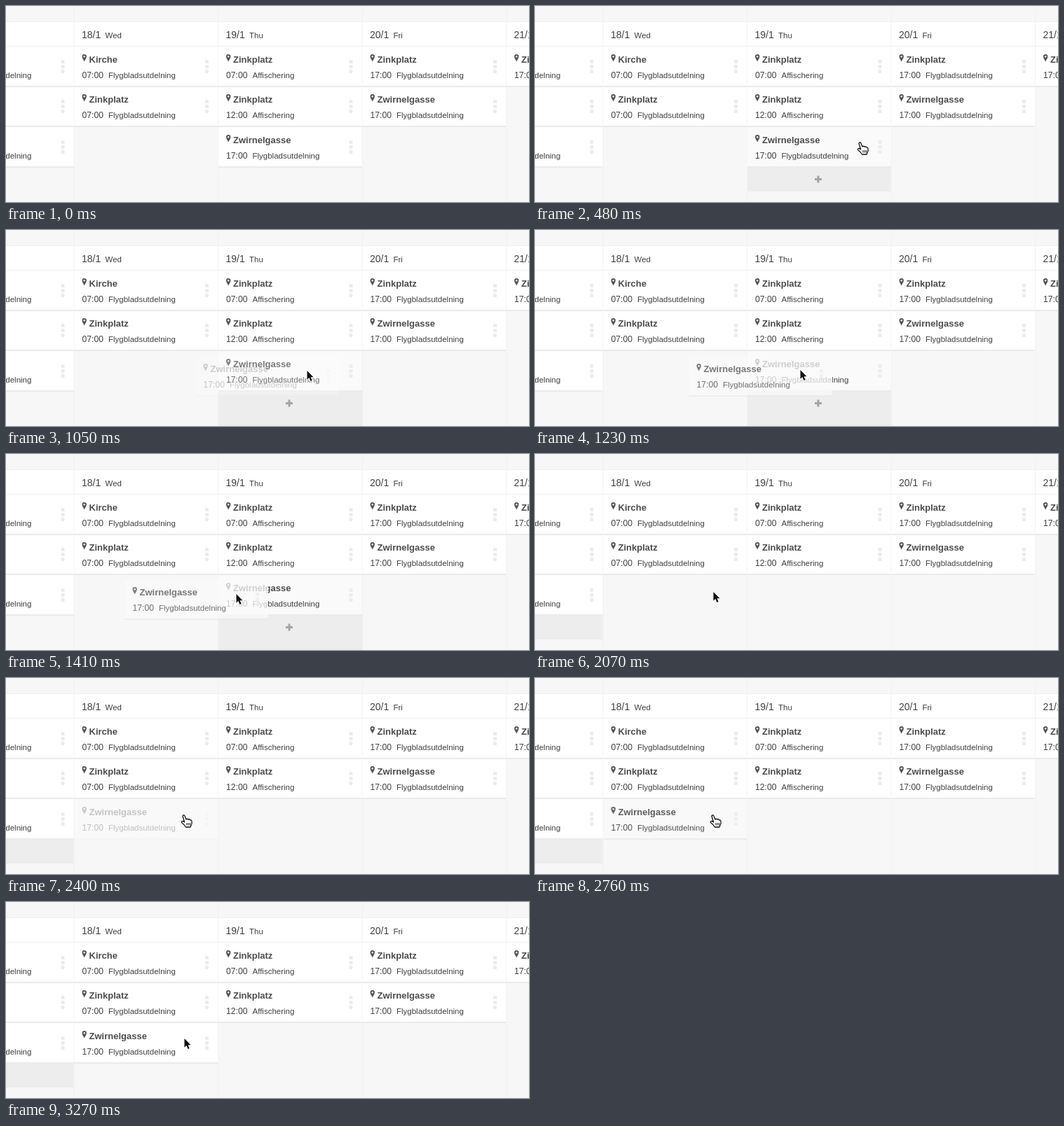
Animation of 746x280 px, one loop 3.3 s. Source, as an HTML page with a canvas:

```html
<!DOCTYPE html>
<html lang="sv">
<head>
<meta charset="utf-8">
<title>Calendar drag and drop</title>
<style>
html, body { margin: 0; width: 746px; height: 280px; overflow: hidden; background: #f7f7f7; }
canvas { display: block; }
</style>
</head>
<body>
<canvas width="746" height="280"></canvas>
<script>
const ctx = document.querySelector('canvas').getContext('2d');
const LOOP = 3300, LEFT = -108.5, COL = 205.5, ROW = 57.4;
const DRAG = 960, CROSS = 1490, DROP = 2050, FADE = 2220, REST = 2900;
const FONT = '"Liberation Sans", Arial, sans-serif';
const SQUARE = 'Zinkplatz', STREET = 'Zwirnelgasse';
const FLYER = 'Flygbladsutdelning', POSTER = 'Affischering';

const moved = [STREET, '17:00', FLYER];
const days = [
  ['17/1', 'Tue', [['Kirche', '07:00', FLYER], ['Kirche', '12:00', POSTER], ['Kirche', '17:00', FLYER]]],
  ['18/1', 'Wed', [['Kirche', '07:00', FLYER], [SQUARE, '07:00', FLYER]]],
  ['19/1', 'Thu', [[SQUARE, '07:00', POSTER], [SQUARE, '12:00', POSTER]]],
  ['20/1', 'Fri', [[SQUARE, '17:00', FLYER], [STREET, '17:00', FLYER]]],
  ['21/1', 'Sat', [[SQUARE, '17:00', FLYER]]]
];

// Pointer keys: time, x, y
const track = [
  [30, 490, 286], [240, 472, 216], [450, 464, 195], [840, 464, 195], [960, 452, 198],
  [1050, 429, 200], [1410, 328, 199], [1530, 290, 197], [1680, 261, 194], [1860, 254, 196]
];

const pin = new Path2D('M3.2 0a3.2 3.2 0 0 1 3.2 3.3C6.4 5.6 4.4 7.6 3.2 10.6 2 7.6 0 5.6 0 3.3A3.2 3.2 0 0 1 3.2 0zM3.2 2a1.3 1.3 0 1 0 0 2.6 1.3 1.3 0 0 0 0-2.6z');
const arrow = new Path2D('M0 0V12.8L2.9 10.1 5 15 7.2 14.1 5.1 9.3H9z');
const hand = new Path2D('M-2 1Q-.5-1.5 1 1L3 6Q4.6 4.4 6 6.2 7.8 5 8.8 7 11 6.4 11 9V12L9 17H2.5Q0 13-3.5 10.5-3.8 7.8-1.4 8.6L.6 10z');
const knuckles = new Path2D('M4 11V14.5M6.2 11V14.5M8.4 11V14.5');

const at = i => LEFT + COL * i;
const rowTop = i => Math.round(57 + ROW * i);
const clamp = v => Math.max(0, Math.min(1, v));

function rect(x, y, w, h, color) {
  ctx.fillStyle = color;
  ctx.fillRect(x, y, w, h);
}

function text(s, x, y, size, weight = 400, color = '#404040') {
  ctx.font = `${weight} ${size}px ${FONT}`;
  ctx.fillStyle = color;
  ctx.fillText(s, x, y);
}

function card([place, time, job], x, y, alpha = 1, bg = '#fff') {
  ctx.globalAlpha = alpha;
  rect(x + .5, y + 1, COL - 1, 56, bg);
  rect(x + .5, y + 57, COL - 1, 2, '#ebebeb');
  ctx.save();
  ctx.translate(x + 11.5, y + 12);
  ctx.fillStyle = '#555';
  ctx.fill(pin, 'evenodd');
  ctx.restore();
  text(place, x + 21.5, y + 24, 13, 700, '#4c4c4c');
  text(time, x + 11.5, y + 46, 12.2);
  text(job, x + 49, y + 46, 11.5);
  for (let i = 0; i < 3; i++) {
    ctx.fillStyle = '#ececec';
    ctx.beginPath();
    ctx.roundRect(x + 187, y + 20 + 7 * i, 5, 5, 1);
    ctx.fill();
  }
  ctx.globalAlpha = 1;
}

function addBar(i) {
  const x = at(i), mid = x + 101.5;
  rect(x + .5, 230, COL - 1, 35, '#ededed');
  rect(mid - 5, 246, 10, 3, '#a3a3a3');
  rect(mid - 1.5, 242.5, 3, 10, '#a3a3a3');
}

function pointer(t) {
  const i = track.findIndex(k => k[0] > t);
  if (i < 0) return track[track.length - 1].slice(1);
  const a = track[i - 1], b = track[i], f = (t - a[0]) / (b[0] - a[0]);
  return [a[1] + (b[1] - a[1]) * f, a[2] + (b[2] - a[2]) * f];
}

function drawPointer(x, y, pointing) {
  ctx.save();
  ctx.translate(Math.round(x), Math.round(y));
  ctx.lineJoin = 'round';
  if (pointing) {
    ctx.fillStyle = '#fff';
    ctx.strokeStyle = '#111';
    ctx.fill(hand);
    ctx.lineWidth = 1.3;
    ctx.stroke(hand);
    ctx.lineWidth = 1;
    ctx.stroke(knuckles);
  } else {
    ctx.fillStyle = '#111';
    ctx.strokeStyle = '#fff';
    ctx.lineWidth = 2;
    ctx.translate(.5, 1);
    ctx.stroke(arrow);
    ctx.fill(arrow);
  }
  ctx.restore();
}

function draw(t) {
  rect(0, 0, 746, 280, '#f7f7f7');
  if (t >= DRAG && t < CROSS) rect(at(2), 230, COL, 50, '#ededed');
  if (t >= CROSS && t < DROP) rect(at(1), 172, COL, 108, '#ededed');
  rect(0, 22, 746, 36, '#efefef');
  days.forEach(([date, day, cards], i) => {
    const x = at(i);
    rect(x, 0, 1, 280, '#f1f1f1');
    rect(x + .5, 23, COL - 1, 34, '#fff');
    text(date, x + 11, 46, 14);
    text(day, x + 44.5, 46, 11.5);
    // Lower cards first, so that each bottom edge lies over the next card
    for (let r = cards.length - 1; r >= 0; r--) card(cards[r], x, rowTop(r));
  });

  const entered = t >= 30;
  const [x, y] = entered ? pointer(t) : [0, 0];
  if (t < DROP) {
    if (entered) addBar(2);
    const hover = entered && y < 230;
    card(moved, at(2), rowTop(2), 1, hover ? '#fafafa' : '#fff');
  } else {
    addBar(0);
    card(moved, at(1), rowTop(2), clamp((t - FADE) / 600), t < REST ? '#fafafa' : '#fff');
  }
  if (t >= DRAG && t < DROP) {
    card(moved, Math.round(x - 159), Math.round(y - 20.6), .75 * clamp((t - DRAG) / 260), '#fafafa');
  }
  if (entered) {
    const pointing = t < DRAG ? y < 265 : t >= FADE && t < REST;
    drawPointer(x, t < REST ? y : y - 2, pointing);
  }
}

const start = performance.now();
function tick(now) {
  draw(Math.max(0, now - start) % LOOP);
  requestAnimationFrame(tick);
}
draw(0);
requestAnimationFrame(tick);
</script>
</body>
</html>
```
